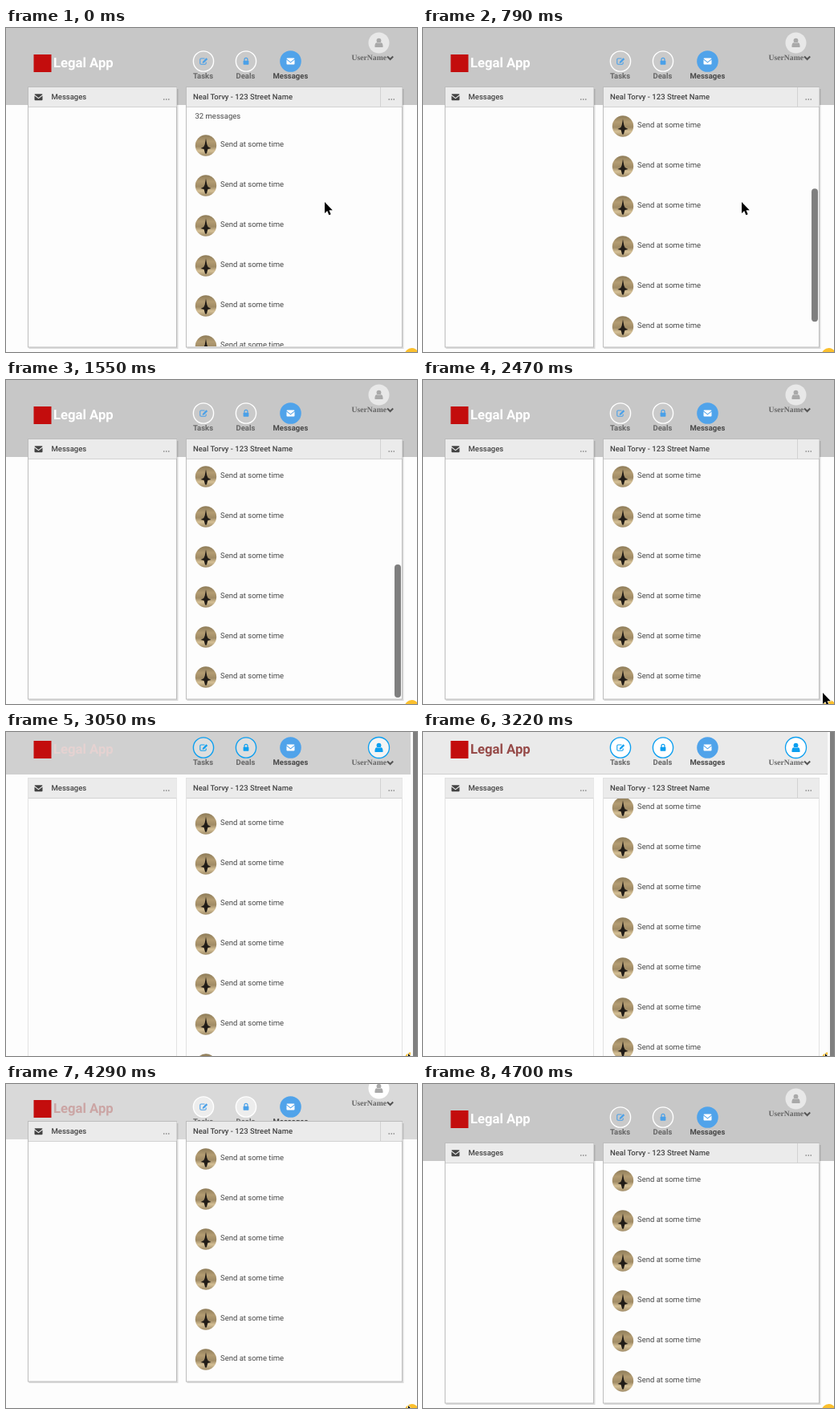
An HTML page for the animation above (5030 ms loop, 512x404 px).

```html
<!DOCTYPE html>
<html lang="en">
<head>
<meta charset="utf-8">
<title>Messages</title>
<style>
  html, body { margin: 0; width: 100%; height: 100%; overflow: hidden; background: #fdfdfd; }
  svg { display: block; width: 100%; height: 100%; }
  text { font: 9.5px Roboto, sans-serif; fill: #484848; text-rendering: geometricPrecision; }
  .title { font-size: 16.7px; font-weight: 700; }
  .label { font-weight: 700; fill: #666; }
  .active { fill: #484848; }
  .head { font-weight: 500; fill: #444; }
  .user { font: bold 9.7px "Liberation Serif", "Times New Roman", serif; fill: #666; }
  .bar { fill: #ebebeb; }
  .rule { stroke: #d2d2d2; }
  .thumb { fill: #7f7f7f; }
</style>
</head>
<body>
<svg viewBox="0 0 512 404" preserveAspectRatio="none">
  <defs>
    <linearGradient id="sky" x2="0" y2="1">
      <stop offset="0" stop-color="#8d7b58"/>
      <stop offset=".3" stop-color="#b39c72"/>
      <stop offset=".55" stop-color="#a08b65"/>
      <stop offset=".75" stop-color="#d5c096"/>
      <stop offset="1" stop-color="#a08c68"/>
    </linearGradient>
    <clipPath id="body"><rect id="bodyClip" x="225" width="269"/></clipPath>
    <g id="mail">
      <path d="M-5-3.2Q-5-4-4-4H4Q5-4 5-3.2L0 .8Z"/>
      <path d="M-5-1.9L0 2L5-1.9V3Q5 4 4 4H-4Q-5 4-5 3Z"/>
    </g>
    <g id="row">
      <circle cx="249" r="13.2" fill="url(#sky)"/>
      <path transform="translate(249)" fill="#211c17"
        d="M0-9L1.3-1.5L2.6 1.5L6.5 3.4L2.4 4.6L.9 10H-.9L-2.4 4.6L-6.5 3.4L-2.6 1.5L-1.3-1.5Z"/>
      <text x="267" y="1.5">Send at some time</text>
    </g>
  </defs>

  <rect width="512" height="404" fill="#fdfdfd"/>
  <rect id="header" width="512"/>
  <path id="headerLine" d="M0 52.5H512" stroke="#cfcfcf"/>

  <g id="nav">
    <rect x="34.5" y="33" width="22" height="22" fill="#c30d0d"/>
    <text id="title" class="title" x="59" y="49">Legal App</text>
    <g id="rings" stroke-width="1.4">
      <circle cx="246" cy="41.5" r="12.6"/>
      <circle cx="299" cy="41.5" r="12.6"/>
    </g>
    <circle cx="354.5" cy="41.5" r="13.3" fill="#50a3ea"/>
    <use href="#mail" x="354.5" y="41.5" fill="#fff"/>
    <g id="glyphs">
      <path transform="translate(246 41.5)" fill="none" stroke="currentColor" stroke-width="1.1"
        d="M1.5-3.5H-3Q-4.2-3.5-4.2-2.3V2.6Q-4.2 3.8-3 3.8H2Q3.2 3.8 3.2 2.6V1"/>
      <path transform="translate(246 41.5)" fill="currentColor" d="M3.6-4.2L5.2-2.6L.6 2L-1.4 2.3L-1 .4Z"/>
      <rect x="295.6" y="40.8" width="6.8" height="5" rx=".7" fill="currentColor"/>
      <path d="M297 41V39.3A2 2 0 0 1 301 39.3V41" fill="none" stroke="currentColor" stroke-width="1.2"/>
    </g>
    <g id="labels">
      <text class="label" x="233" y="63">Tasks</text>
      <text class="label" x="286.5" y="63">Deals</text>
      <text class="label active" x="332.5" y="63">Messages</text>
    </g>
  </g>

  <g id="account">
    <circle id="face" cx="464.5" cy="18.5" r="13"/>
    <g id="person">
      <circle cx="464.5" cy="15.7" r="2.9"/>
      <path d="M459.4 23.5Q459.4 18.2 462 18.2Q464.5 20 467 18.2Q469.6 18.2 469.6 23.5Q469.3 24 468.5 24H460.5Q459.7 24 459.4 23.5Z"/>
    </g>
    <text class="user" x="430.5" y="40">UserName</text>
    <path d="M475 35.5L478.6 39L482.2 35.5" fill="none" stroke="#555" stroke-width="2"/>
  </g>

  <g id="shadows" fill="#000" fill-opacity=".13">
    <rect x="28.5" y="76" width="186" height="324"/>
    <rect x="225.5" y="76" width="270" height="324"/>
  </g>
  <g id="frames" fill="#fdfdfd">
    <rect x="27.5" width="185"/>
    <rect x="224.5" width="269"/>
  </g>
  <g clip-path="url(#body)">
    <g id="list"><text x="235.5" y="113">32 messages</text></g>
  </g>
  <g id="heads">
    <rect class="bar" x="28" y="74" width="184.5" height="24"/>
    <rect class="bar" x="225" y="74" width="268.5" height="24"/>
    <path class="rule" d="M28 98.5H212M225 98.5H493M466.5 74V98"/>
    <use href="#mail" x="40.5" y="86.3" fill="#444"/>
    <text class="head" x="56.5" y="89.3">Messages</text>
    <text class="head" x="233" y="89.3">Neal Torvy - 123 Street Name</text>
    <path d="M196 89H203.5M476.5 89H484" stroke="#8a8a8a" stroke-width="1.4" stroke-dasharray="1.5"/>
  </g>
  <rect id="listThumb" class="thumb" x="484" width="8" height="166" rx="4"/>

  <circle cx="505.5" cy="408" r="9" fill="#fbc02d"/>
  <g id="pageBar">
    <rect x="504" width="8" height="404" fill="#fafafa"/>
    <rect class="thumb" x="507" width="5" height="404"/>
  </g>
  <path id="cursor" d="M0 0V14L3.2 11L5.4 16.3L7.7 15.3L5.5 10.2H9.8Z" stroke="#fff" stroke-width="1.2" paint-order="stroke"/>
</svg>

<script>
const LOOP = 5030;
const BLUE = '#0c9ff0';
const $ = id => document.getElementById(id);
const set = (el, attrs) => { for (const k in attrs) el.setAttribute(k, attrs[k]); };
const clamp = v => Math.max(0, Math.min(1, v));
const smooth = v => v * v * (3 - 2 * v);
const lerp = (a, b, p) => a + (b - a) * p;
const mix = (a, b, p) => `rgb(${a.map((v, i) => Math.round(lerp(v, b[i], p)))})`;
const shift = (id, y, x = 0) => set($(id), { transform: `translate(${x} ${y})` });

// Progress in n equal jumps; the first one lands at time a, the last at b.
function jumps(t, a, b, n) {
  if (t < a) return 0;
  return Math.min(n, Math.floor((t - a) / (b - a) * (n - 1) + 0.02) + 1) / n;
}

for (let i = 0; i < 14; i++) {
  const row = document.createElementNS('http://www.w3.org/2000/svg', 'use');
  set(row, { href: '#row', y: 146.5 + 50 * i });
  $('list').append(row);
}

function drawHeader(sticky, s, k) {
  const lift = sticky ? -22 : -Math.round(s * 0.48);
  set($('header'), { height: sticky ? 52 : 96 - s, fill: mix([199, 199, 199], [234, 234, 234], k) });
  set($('headerLine'), { opacity: sticky ? 1 : 0 });
  shift('nav', lift);
  shift('account', sticky ? 1 : lift);
  $('title').style.fill = mix([255, 255, 255], [150, 74, 72], k);
  set($('rings'), { stroke: sticky ? BLUE : '#fff', fill: '#fff', 'fill-opacity': 0.06 + 0.94 * k });
  set($('glyphs'), { color: sticky ? BLUE : '#4aa0e8' });
  set($('face'), {
    fill: mix([232, 232, 232], [255, 255, 255], clamp(k * 2)),
    stroke: sticky ? BLUE : 'none',
    'stroke-width': 1.3
  });
  set($('person'), { fill: sticky ? BLUE : '#a9a9a9' });
}

function drawPanels(sticky, s, scroll) {
  const top = sticky ? 58 : 74 - s;
  const height = sticky ? 400 : 324;
  shift('heads', top - 74);
  shift('shadows', top - 74);
  set($('shadows'), { opacity: sticky ? 0 : 1 });
  set($('frames'), { stroke: sticky ? '#e2e2e2' : '#bdbdbd' });
  for (const r of $('frames').children) set(r, { y: top - 0.5, height: height + 0.5 });
  set($('bodyClip'), { y: top + 25, height: height - 26 });
  shift('list', -scroll - s);
}

function drawCursor(t) {
  const out = smooth(jumps(t, 1200, 1550, 7));
  let x = lerp(397, 455, out), y = lerp(217, 412, out);
  if (t >= 2140) {
    const i = jumps(t, 2140, 2640, 9) * 9 - 1;
    const a = clamp(i / 5), b = clamp((i - 5) / 3);
    x = lerp(453, 498, a) + 3 * b;
    y = lerp(404, 390, a) + 11 * b;
  }
  shift('cursor', y, x);
  set($('cursor'), { opacity: t < 4640 ? 1 : 0 });
}

function draw(t) {
  const scroll = Math.round(226 * smooth(jumps(t, 540, 900, 7) ** 1.11));
  const up = jumps(t, 2700, 3220, 9);
  const down = jumps(t, 4170, 4700, 10);
  const s = Math.round(76 * smooth(up) * (1 - down) ** 2.9);
  const sticky = s > 45;
  const k = clamp((up * 9 - 5) / 4) - clamp((down * 10 - 1) / 4);

  drawHeader(sticky, s, k);
  drawPanels(sticky, s, scroll);
  drawCursor(t);

  const fade = clamp(1 - jumps(t, 2140, 2640, 9) * 9 / 6);
  set($('listThumb'), { y: 101 + scroll / 226 * 129, opacity: t < 540 ? 0 : fade });
  set($('pageBar'), { opacity: t < 2700 ? 0 : 1 - jumps(t, 3280, 3460, 4) });
}

function tick() {
  draw(performance.now() % LOOP);
  requestAnimationFrame(tick);
}
tick();
</script>
</body>
</html>
```
